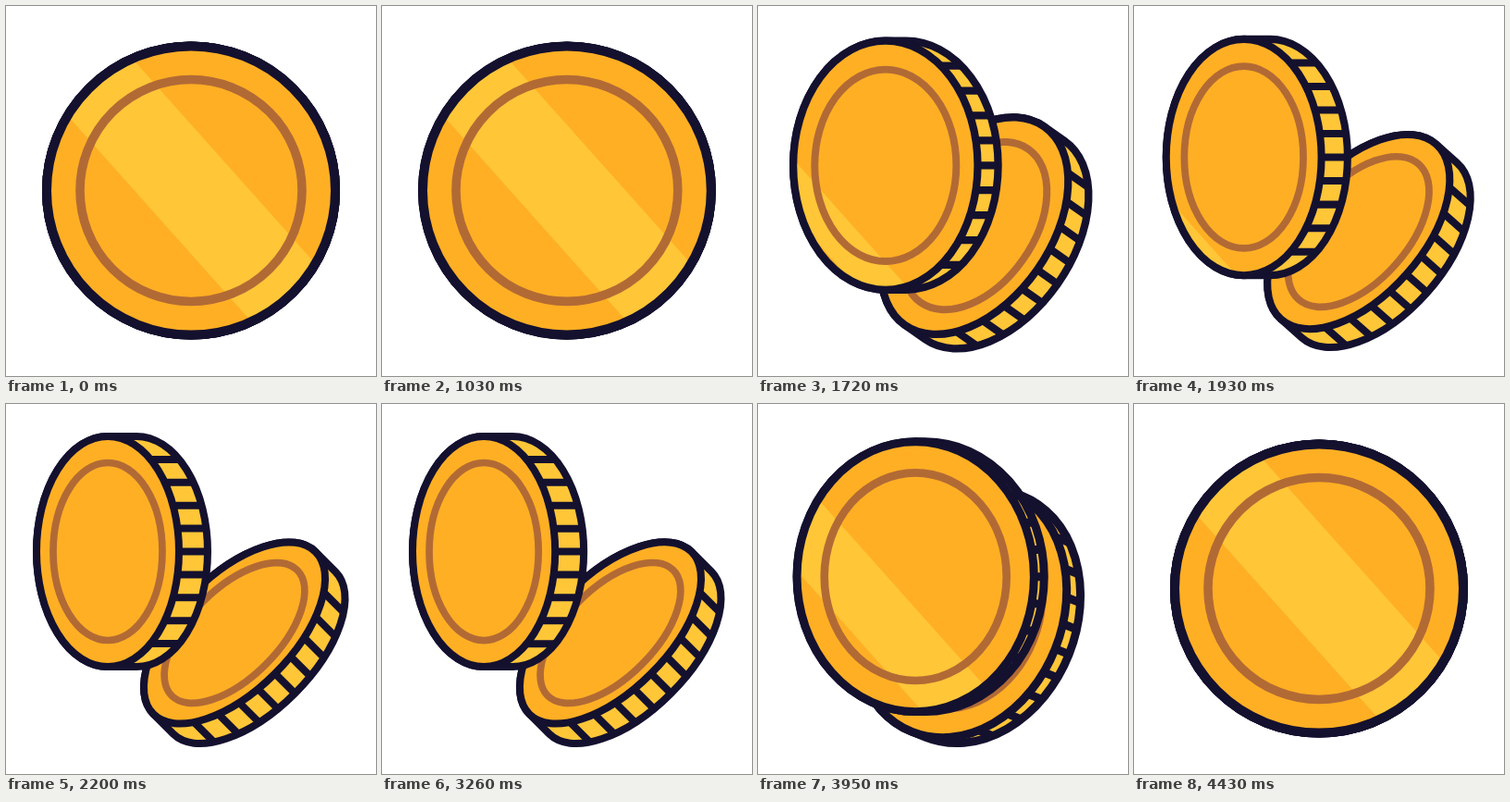
An HTML page with a canvas for the animation above (4460 ms loop, 400 by 400 pixels).

```html
<!DOCTYPE html>
<html lang="en">
<head>
<meta charset="utf-8">
<title>Coins</title>
<style>
  html, body { margin: 0; width: 100%; height: 100%; overflow: hidden; background: #fff; }
  canvas { display: block; width: 400px; height: 400px; }
</style>
</head>
<body>
<canvas id="stage" width="400" height="400"></canvas>
<script>
const ctx = document.getElementById('stage').getContext('2d');
const LOOP = 4460, OPEN_AT = 1000, CLOSE_AT = 3230, MOVE = 1200, STEP = 30;
const INK = '#14112f', GOLD = '#ffaf24', LIGHT = '#ffc638', BROWN = '#b26a35';

const mix = (a, b, k) => a + (b - a) * k;
const easeInOut = u => u < 0.5 ? 2 * u * u : 1 - 2 * (1 - u) ** 2;

// Share of a move that began at `start`, advancing in 30 ms steps.
function moved(time, start) {
  const local = Math.floor((time - start) / STEP) * STEP;
  return Math.min(1, Math.max(0, local / MOVE));
}

function strokeWith(color, width) {
  ctx.strokeStyle = color;
  ctx.lineWidth = width;
  ctx.stroke();
}

function ellipse(rx, ry) {
  ctx.beginPath();
  ctx.ellipse(0, 0, rx, ry, 0, 0, 2 * Math.PI);
}

// A coin seen at an angle: its rim extends along the local x axis by `depth`.
function drawCoin({ x, y, angle, rx, ry, ringX, ringY, depth, line, shine }) {
  ctx.save();
  ctx.translate(x, y);
  ctx.rotate(angle);

  const quarter = Math.PI / 2;
  ctx.beginPath();
  ctx.ellipse(depth, 0, rx, ry, 0, -quarter, quarter);
  ctx.ellipse(0, 0, rx, ry, 0, quarter, 3 * quarter);
  ctx.closePath();
  ctx.fillStyle = LIGHT;
  ctx.fill();
  strokeWith(INK, line);

  ctx.beginPath();
  for (let k = -4; k <= 4; k++) {
    const edge = rx * Math.sqrt(1 - (k / 5) ** 2);
    ctx.moveTo(edge, ry * k / 5);
    ctx.lineTo(edge + depth, ry * k / 5);
  }
  strokeWith(INK, line);

  ellipse(rx, ry);
  ctx.fillStyle = GOLD;
  ctx.fill();
  if (shine) {
    ctx.save();
    ctx.clip();
    ctx.translate(-x, -y);
    drawShine(shine);
    ctx.restore();
  }
  ellipse(ringX, ringY);
  strokeWith(BROWN, line * 0.96);
  ellipse(rx, ry);
  strokeWith(INK, line);
  ctx.restore();
}

// Diagonal band between two parallel lines y = slope * x + c.
function drawShine({ top, width }) {
  const drop = 1.12 * 400;
  ctx.beginPath();
  ctx.moveTo(0, top);
  ctx.lineTo(400, top + drop);
  ctx.lineTo(400, top + drop + width);
  ctx.lineTo(0, top + width);
  ctx.fillStyle = LIGHT;
  ctx.fill();
}

function draw(p) {
  ctx.fillStyle = '#fff';
  ctx.fillRect(0, 0, 400, 400);

  // Some parts run ahead of the main progress; the rear coin most of all.
  const ahead = amount => p + amount * p * (1 - p);
  const lead = p * (1 - p) * (1 - 0.8 * p);
  const rear = p + lead;
  const turn = ahead(0.15);
  const line = mix(10, 8, ahead(0.9));

  drawCoin({
    x: mix(200, 247, p + 0.45 * lead), y: mix(199.5, 247.5, p + 1.15 * lead),
    angle: rear * Math.PI / 4,
    rx: mix(156, 62, rear), ry: mix(156, 124, rear),
    ringX: mix(120, 48, rear), ringY: mix(120, 96, rear),
    depth: mix(0, 30.4, ahead(0.95)), line
  });
  drawCoin({
    x: mix(200, 110, ahead(0.05)), y: mix(199.5, 159.5, p),
    angle: 0,
    rx: mix(156, 77, turn), ry: mix(156, 124.5, p),
    ringX: mix(120, 59, turn), ringY: mix(120, 96, p),
    depth: mix(0, 31, turn), line,
    shine: {
      top: -96 + 485 * p - 320 * p ** 2 + 118 * p ** 3,
      width: mix(140, 24, p)
    }
  });
}

const start = performance.now();
function frame() {
  const time = (performance.now() - start) % LOOP;
  draw(easeInOut(moved(time, OPEN_AT) - moved(time, CLOSE_AT)));
  requestAnimationFrame(frame);
}
frame();
</script>
</body>
</html>
```
